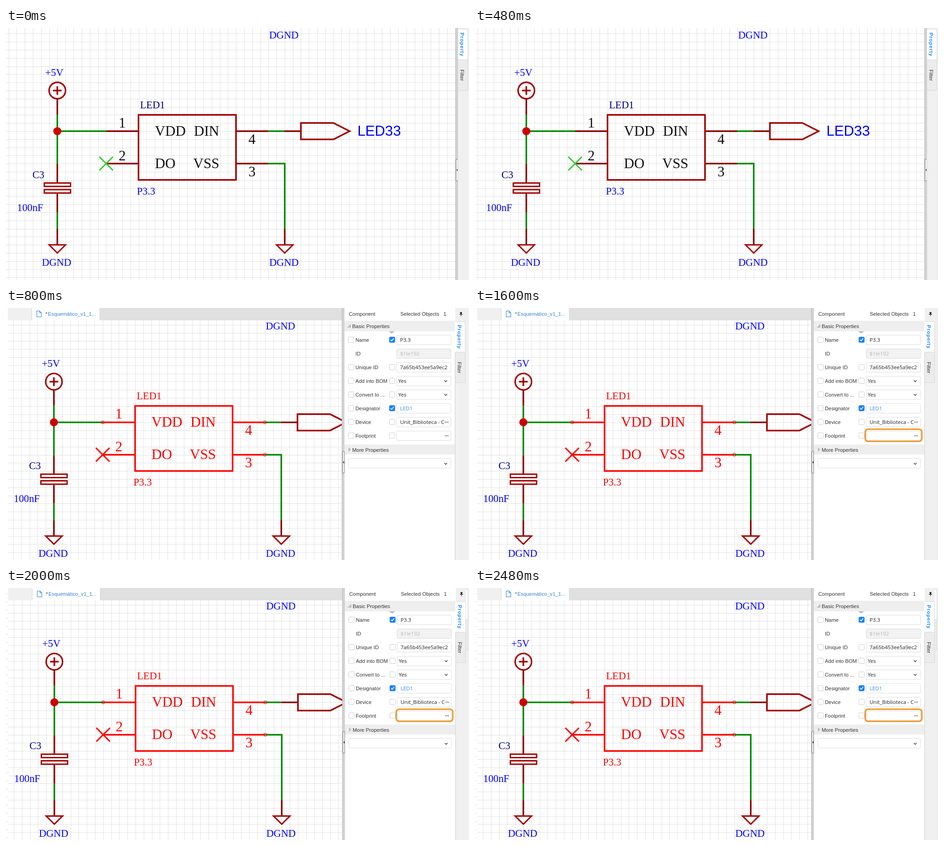
Recreate the animation shown at these times as an HTML page with a canvas. Size 1015 px wide and 552 px high, loop 2.8 s.

```html
<!DOCTYPE html>
<html lang="en">
<head>
<meta charset="utf-8">
<title>Schematic editor</title>
<style>
html, body { margin: 0; width: 100%; height: 100%; overflow: hidden; background: #fff; }
canvas { display: block; }
</style>
</head>
<body>
<canvas id="stage" width="1015" height="552"></canvas>
<script>
const W = 1015, H = 552, LOOP = 2800, PITCH = 17.8;
const SERIF = '"Liberation Serif", "Times New Roman", serif';
const SANS = '"Liberation Sans", Arial, sans-serif';
const UI = '"Open Sans", "Noto Sans", sans-serif';
const DARK = '#880000', BODY = '#a00000', GREEN = '#008800', BLUE = '#0000ff', NAVY = '#000080', RED = '#ff0000';
const ctx = document.getElementById('stage').getContext('2d');

function box(x, y, w, h, color) {
  ctx.fillStyle = color;
  ctx.fillRect(x, y, w, h);
}

function path(points, color, width = 3.5, { close = false, fill } = {}) {
  ctx.beginPath();
  for (let i = 0; i < points.length; i += 2) ctx.lineTo(points[i], points[i + 1]);
  if (close) ctx.closePath();
  if (fill) { ctx.fillStyle = fill; ctx.fill(); }
  if (color) { ctx.strokeStyle = color; ctx.lineWidth = width; ctx.stroke(); }
}

function circle(x, y, r, color, width) {
  ctx.beginPath();
  ctx.arc(x, y, r, 0, 7);
  ctx.fillStyle = ctx.strokeStyle = color;
  ctx.lineWidth = width;
  width ? ctx.stroke() : ctx.fill();
}

function rounded(x, y, w, h, r, stroke, fill, width = 1) {
  ctx.beginPath();
  ctx.roundRect(x, y, w, h, r);
  if (fill) { ctx.fillStyle = fill; ctx.fill(); }
  ctx.strokeStyle = stroke;
  ctx.lineWidth = width;
  ctx.stroke();
}

function text(string, x, y, color, size, family) {
  ctx.font = `${size}px ${family}`;
  ctx.fillStyle = color;
  ctx.fillText(string, x, y);
}

function clipped(x, y, w, h, draw) {
  ctx.save();
  ctx.beginPath();
  ctx.rect(x, y, w, h);
  ctx.clip();
  draw();
  ctx.restore();
}

function shifted(dx, dy, draw) {
  ctx.save();
  ctx.translate(dx, dy);
  draw();
  ctx.restore();
}

function label(string, x, y, color) { text(string, x, y, color, 22.25, SERIF); }

function ground(x) {
  path([x, 440, x, 475], DARK);
  path([x - 18, 475, x + 18, 475, x, 493], BODY, 3, { close: true });
  label('DGND', x - 33.7, 521, BLUE);
}

function grid(dx, dy) {
  const start = (origin) => origin % PITCH - PITCH;
  for (let x = start(112.5 + dx); x < W; x += PITCH) box(Math.round(x), 0, 1, H, '#e2e2e2');
  for (let y = start(226 + dy); y < H; y += PITCH) box(0, Math.round(y), W, 1, '#e2e2e2');
}

function schematic(selected) {
  const pick = (color) => selected ? RED : color;
  const pinText = (s, x, y) => text(s, x, y, pick('#111'), 31.15, SERIF);

  label('DGND', 577, 23, BLUE);

  // Supply and capacitor
  label('+5V', 86, 105, BLUE);
  circle(112.5, 137, 18, BODY, 3.3);
  path([103, 137, 122, 137], BODY);
  path([112.5, 127.5, 112.5, 146.5], BODY);
  path([112.5, 155, 112.5, 190], DARK);
  path([112.5, 190, 112.5, 298], GREEN);
  path([112.5, 298, 112.5, 340], DARK);
  path([112.5, 361, 112.5, 404], DARK);
  path([112.5, 404, 112.5, 440], GREEN);
  for (const y of [339.5, 354]) path([84, y, 141.5, y, 141.5, y + 7.5, 84, y + 7.5], BODY, 3, { close: true });
  label('C3', 58, 329, NAVY);
  label('100nF', 24.5, 401, BLUE);
  ground(112.5);

  // Wires
  path([112.5, 226, 220, 226], GREEN);
  path([575, 226, 610, 226], GREEN);
  path([575, 297, 611, 297, 611, 440], GREEN);
  circle(112.5, 226, 8.8, '#cc0000');
  ground(611);

  // LED component
  for (const y of [226, 297]) {
    path([219.5, y, 290.5, y], pick(DARK));
    path([504, y, 575, y], pick(DARK));
  }
  path([290.5, 190.2, 504.2, 190.2, 504.2, 332.7, 290.5, 332.7], pick(BODY), 3.5, { close: true });
  const cross = pick('#33cc33');
  path([204.5, 282, 234.5, 312], cross, 3);
  path([204.5, 312, 234.5, 282], cross, 3);
  if (selected) for (const [x, y] of [[219.5, 226], [575, 226], [575, 297]]) circle(x, y, 3.5, RED, 1);
  label('LED1', 294, 176, pick(NAVY));
  label('P3.3', 287, 365, pick(BLUE));
  pinText('VDD', 326.5, 236);
  pinText('DIN', 412, 236);
  pinText('DO', 326.5, 307);
  pinText('VSS', 410.5, 307);
  pinText('1', 247, 218);
  pinText('2', 247, 290);
  pinText('4', 531.5, 254);
  pinText('3', 531.5, 325);

  // Output port
  path([610, 226, 646, 226], DARK);
  path([646.5, 208, 717.7, 208, 753.3, 226, 717.7, 244, 646.5, 244], BODY, 3.5, { close: true });
  text('LED33', 770.5, 236, BLUE, 31.15, SANS);
}

function splitter() {
  box(985, -27, 6, H + 27, '#d2d2d2');
  box(985, -27, 1, H + 27, '#bbb');
  rounded(986.5, 287.5, 4, 47, 0, '#777', '#f4f4f4');
  path([990.5, 308, 990.5, 314, 987.5, 311], null, 0, { close: true, fill: '#333' });
}

function verticalText(string, x, y, color, font, spacing) {
  ctx.save();
  ctx.translate(x, y);
  ctx.rotate(Math.PI / 2);
  ctx.letterSpacing = spacing;
  ctx.font = `${font} ${SANS}`;
  ctx.fillStyle = color;
  ctx.fillText(string, 0, 0);
  ctx.restore();
}

function sidebar() {
  box(991, -27, 40, H + 27, '#f0f0f0');
  box(991, 3, 21, 67, '#fff');
  box(991, 70, 21, 66, '#ececec');
  path([991, 2.5, 1012.5, 2.5, 1012.5, 136.5, 991, 136.5], '#d8d8d8', 1);
  path([991, 69.5, 1012, 69.5], '#d8d8d8', 1);
  path([990.5, 70, 990.5, H], '#d0d0d0', 1);
  verticalText('Property', 995.5, 10, '#1e88f5', 'bold 11px', '0.9px');
  verticalText('Filter', 995.5, 91, '#333', '11.25px', '0px');
}

function overview() {
  box(0, 0, W, H, '#fff');
  clipped(0, 0, 985, H, () => { grid(0, 0); schematic(false); });
  splitter();
  sidebar();
}

function checkbox(x, y, checked) {
  rounded(x + 0.5, y - 6.5, 12, 12, 2, checked ? '#1a82f7' : '#ccc', checked ? '#1a82f7' : '#fff');
  if (checked) path([x + 3, y - 0.5, x + 5.5, y + 2, x + 10, y - 3.5], '#fff', 1.7);
}

function field(x, y, w, fill = '#fff') { rounded(x + 0.5, y - 10.5, w - 1, 21, 2, '#dcdcdc', fill); }

function chevron(y) { path([962, y - 1.5, 965, y + 1.5, 968, y - 1.5], '#333', 1.3); }

function properties(highlight) {
  const caption = (s, x, y, color = '#333') => text(s, x, y + 4, color, 11.25, SANS);
  const value = (s, x, y, color) => text(s, x, y + 4, color, 11.5, UI);
  const rows = [
    ['Name', 'P3.3'], ['ID', '$1Ie192'], ['Unique ID', '7a65b453ee5a9ec2'], ['Add into BOM', 'Yes'],
    ['Convert to ...', 'Yes'], ['Designator', 'LED1'], ['Device', 'Unit_Biblioteca - C'], ['Footprint', '']
  ];

  box(743, 0, 242, H, '#fff');
  caption('Component', 752.5, 13);
  caption('Selected Objects', 865.5, 13);
  caption('1', 960, 13);
  box(743, 28, 242, 23, '#eee');
  path([749, 43, 757, 43, 757, 35], null, 0, { fill: '#bbb' });
  caption('Basic Properties', 760, 39.5);
  path([840, 51, 853, 51, 846.5, 56], null, 0, { fill: '#bbb' });

  rows.forEach(([name, content], i) => {
    const y = 70 + i * 30, readOnly = name === 'ID', isSelect = content === 'Yes', hasMenu = i > 5;
    const checked = name === 'Name' || name === 'Designator';
    if (!readOnly) {
      checkbox(751, y);
      checkbox(841, y, checked);
    }
    caption(name, 767, y);
    field(857, y, 120, readOnly ? '#f2f2f2' : '#fff');
    clipped(857, y - 10, hasMenu ? 105 : 118, 20, () =>
      value(content, isSelect ? 861 : 865, y, readOnly ? '#b8b8b8' : name === 'Designator' ? '#3a8ee6' : '#222'));
    if (isSelect) chevron(y);
    if (hasMenu) for (const x of [964, 967, 970]) circle(x, y, 0.9, '#333');
  });

  box(743, 299, 242, 22, '#eee');
  path([752, 305, 757, 310, 752, 315], null, 0, { fill: '#bbb' });
  caption('More Properties', 760, 310.5);
  field(751, 340, 226);
  chevron(341);

  if (highlight) {
    ctx.save();
    ctx.shadowColor = 'rgba(240,145,28,.5)';
    ctx.shadowBlur = 3;
    rounded(855.5, 265.5, 124, 26.5, 6, '#ef8f1c', null, 2.5);
    ctx.restore();
  }
}

function documentTab() {
  box(5, 0, 52, 27, '#f0f0f0');
  box(207, 0, 531, 27, '#e0e0e0');
  box(57, 0, 150, 27, '#fff');
  box(57, 0, 1, 27, '#d8d8d8');
  box(206, 0, 1, 27, '#d8d8d8');
  path([68.5, 6.5, 74.5, 6.5, 78.5, 10.5, 78.5, 19.5, 68.5, 19.5], '#2f86e0', 1.1, { close: true });
  path([74.5, 6.5, 74.5, 10.5, 78.5, 10.5], '#2f86e0', 1.1);
  text('*', 87.5, 17, '#444', 11.25, SANS);
  text('Esquemático_v1_1...', 93, 17, '#3a80d2', 11.25, SANS);
}

function pushpin() {
  box(996, 9, 5, 1.2, '#222');
  box(997, 10, 3, 4, '#222');
  box(995, 13, 7, 1.3, '#222');
  box(998, 14, 1, 4, '#222');
}

function editor(highlight) {
  box(-1, 0, W + 2, H, '#fff');
  clipped(5, 27, 733, H, () => {
    grid(-6.5, 24.4);
    shifted(-6.5, 24.4, () => schematic(true));
  });
  documentTab();
  shifted(-248, 27, splitter);
  properties(highlight);
  shifted(-5, 27, sidebar);
  pushpin();
}

function render(now) {
  const t = now % LOOP;
  if (t < 800) overview();
  else if (t < 1600) shifted(-1, 0, () => editor(false));
  else {
    editor(true);
    // The overview shows through at the outer edges
    if (t >= 2000) {
      clipped(0, 0, 5, H, overview);
      clipped(1008, 0, 7, H, overview);
    }
  }
  requestAnimationFrame(render);
}
requestAnimationFrame(render);
</script>
</body>
</html>
```
